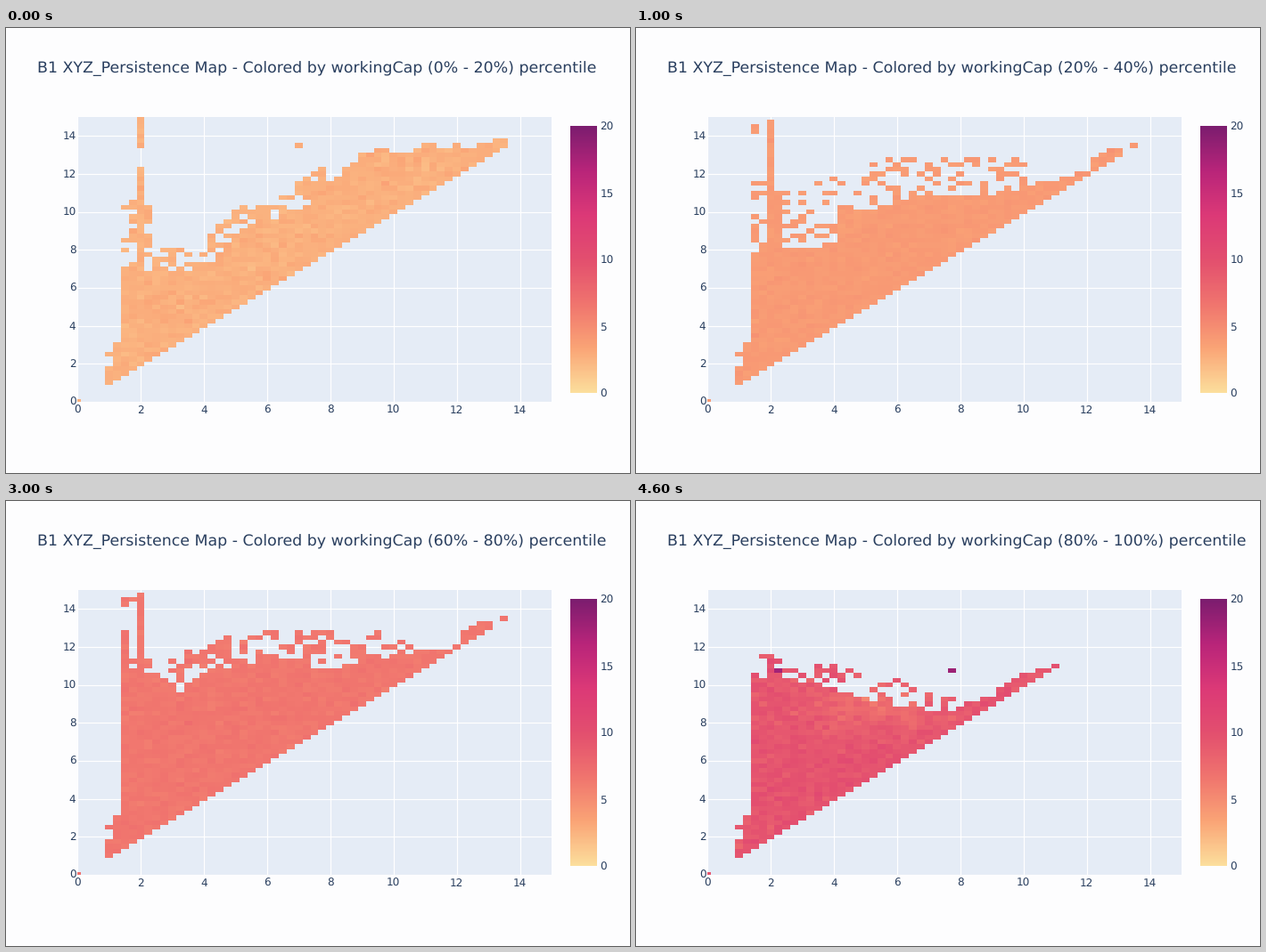
Recreate the animation shown at these times as a matplotlib script. Size 700 by 500 pixels, loop 5000 ms.

```python
import numpy as np
import matplotlib.pyplot as plt
from matplotlib.animation import FuncAnimation
from matplotlib.colors import LinearSegmentedColormap

W, H, DPI = 700, 500, 100
INK, PAPER, PANEL = "#2a3f5f", "#fdfdfe", "#e5ecf6"
STEP = 0.25

plt.rcParams.update({"font.family": "DejaVu Sans", "text.hinting": "none"})

sunset = LinearSegmentedColormap.from_list("sunset", [
    "#fcde9c", "#faa476", "#f0746e", "#e34f6f", "#dc3977", "#b9257a", "#7c1d6f"])

axis = np.arange(0, 15 + STEP, STEP)
edges = np.append(axis, axis[-1] + STEP) - STEP / 2
X, Y = np.meshgrid(axis, axis)


def profile(points):
    return np.interp(X, *zip(*points), left=0, right=0)


def occupancy(body, haze, shaft, density, runs, seed):
    """Solid body on the diagonal, loose bins up to the haze, a few runs."""
    chance = np.random.default_rng(seed).random(X.shape)
    in_shaft = (X >= 1.5) & (X <= 2.25)
    roof = np.where(in_shaft, shaft, profile(haze))
    foot = (X >= 1) & (X < 1.5) & (Y <= 5 * X - 3.25)
    filled = foot | (Y <= profile(body)) | ((Y <= roof) & (chance < density))
    for x, low, high in runs:
        filled |= (X == x) & (Y >= low) & (Y <= high)
    return filled & (Y >= X)


def fill(mask, level, spread, seed):
    noise = np.random.default_rng(seed).normal(0, spread, X.shape)
    return np.where(mask, level + noise, np.nan)


tip = [(12, 12), (12.25, 12.8), (12.75, 13.3), (13, 13.3)]
spike, crumb, outlier = (2, 2, 14.75), (1, 2.5, 2.5), (13.5, 13.5, 13.5)
upper_haze = [(2.5, 11.2), (4.75, 12.5), (7.5, 13.1), (8.5, 12.5),
              (10.2, 13), (10.75, 11.8)]
upper_runs = [spike, crumb, outlier, (1.5, 2, 12.75), (1.5, 14.25, 14.5),
              (1.75, 14.5, 14.5)]

masks = [
    occupancy(
        body=[(1.5, 6.8), (4, 7), (5.2, 9.1), (7, 10), (9, 13), (13.5, 13.6)],
        haze=[(2.5, 8.1), (4, 8.1), (4.8, 10.3), (6.2, 10.3), (7.2, 11.9),
              (9.3, 13.3), (13.5, 13.8)],
        shaft=10.5, density=0.5, seed=1,
        runs=[crumb, (2, 2, 12.25), (2, 13.5, 15), (7, 13.5, 13.5)]),
    occupancy(
        body=[(1.5, 7.2), (1.75, 8.3), (2.25, 10.8), (2.5, 8.1), (4, 8.3),
              (4.25, 9.8), (7, 11), (9, 10.9), (11.75, 12)] + tip,
        haze=[(2.5, 11), (4.75, 12.5), (7.5, 13.2), (10.3, 12.7), (10.5, 11.5)],
        shaft=11.5, density=0.3, seed=2,
        runs=[spike, crumb, outlier, (1.5, 14.25, 14.5)]),
    occupancy(
        body=[(1.5, 10.2), (2.25, 10.7), (2.75, 8.5), (4.5, 10.6), (7, 11),
              (8.5, 10.9), (10, 11.6)] + tip,
        haze=upper_haze, shaft=11.5, density=0.45, seed=3, runs=upper_runs),
    occupancy(
        body=[(1.5, 10.8), (2.5, 10.5), (3.25, 9.6), (5, 11.2), (8.5, 10.9),
              (10, 11.6)] + tip,
        haze=upper_haze, shaft=11.5, density=0.45, seed=3, runs=upper_runs),
    occupancy(
        body=[(1.5, 10.5), (3.5, 10.1), (5, 9.2), (7.5, 8.6), (9, 9.4),
              (9.5, 10.2), (10.25, 10.7), (11, 11)],
        haze=[(2.5, 11.2), (4.75, 10.9), (7, 9.8), (8.5, 9.2)],
        shaft=11.5, density=0.35, seed=5,
        runs=[crumb, (2.25, 10.75, 10.75), (7.75, 10.75, 10.75)]),
]

# The last slice is paler around its upper middle and has two hot bins.
pale = np.exp(-((X - 5.5) / 2.2) ** 2 - ((Y - 9) / 1.3) ** 2)
hot = (Y == 10.75) & ((X == 2.25) | (X == 7.75))
levels = [2.7, 4.0, 5.0, 6.5, np.where(hot, 18.5, 9.6 - 2.4 * pale)]
spreads = [0.25, 0.15, 0.15, 0.2, 0.55]
slices = [fill(*args, seed=k)
          for k, args in enumerate(zip(masks, levels, spreads))]

fig = plt.figure(figsize=(W / DPI, H / DPI), dpi=DPI, facecolor=PAPER)


def panel(x, y, w, h):
    ax = fig.add_axes([x / W, 1 - (y + h) / H, w / W, h / H])
    ax.set(xticks=[], yticks=[], facecolor=PANEL)
    ax.spines[:].set_visible(False)
    return ax


def label(x, y, text, size=12, ha="left"):
    return fig.text(x / W, 1 - y / H, text, size=size * 72 / DPI, color=INK,
                    ha=ha, va="baseline")


plot = panel(80, 100, 532, 320)
for v in range(0, 15, 2):
    line = dict(color="white", lw=1.2 * 72 / DPI, zorder=1)
    plot.axvline(v, **line)
    plot.axhline(v, **line)
    label(80 + v * 532 / 15, 433, str(v), ha="center")
    label(78.5, 424 - v * 320 / 15, str(v), ha="right")

heat = plot.pcolormesh(edges, edges, slices[0], cmap=sunset, vmin=0, vmax=20,
                       zorder=2)
plot.set(xlim=(0, 15), ylim=(0, 15), xticks=[], yticks=[])

bar = panel(633, 110, 30, 300)
bar.imshow(np.linspace(0, 1, 300)[:, None], cmap=sunset, origin="lower",
           aspect="auto")
for v in range(0, 21, 5):
    label(666.5, 414.5 - v * 15, str(v))

title = label(35, 50, "", size=17.4)


def update(k):
    heat.set_array(np.ma.masked_invalid(slices[k]))
    title.set_text("B1 XYZ_Persistence Map - Colored by workingCap "
                   f"({20 * k}% - {20 * k + 20}%) percentile")
    return heat, title


anim = FuncAnimation(fig, update, frames=len(slices), interval=1000,
                     repeat=True, repeat_delay=0)
plt.show()
```
